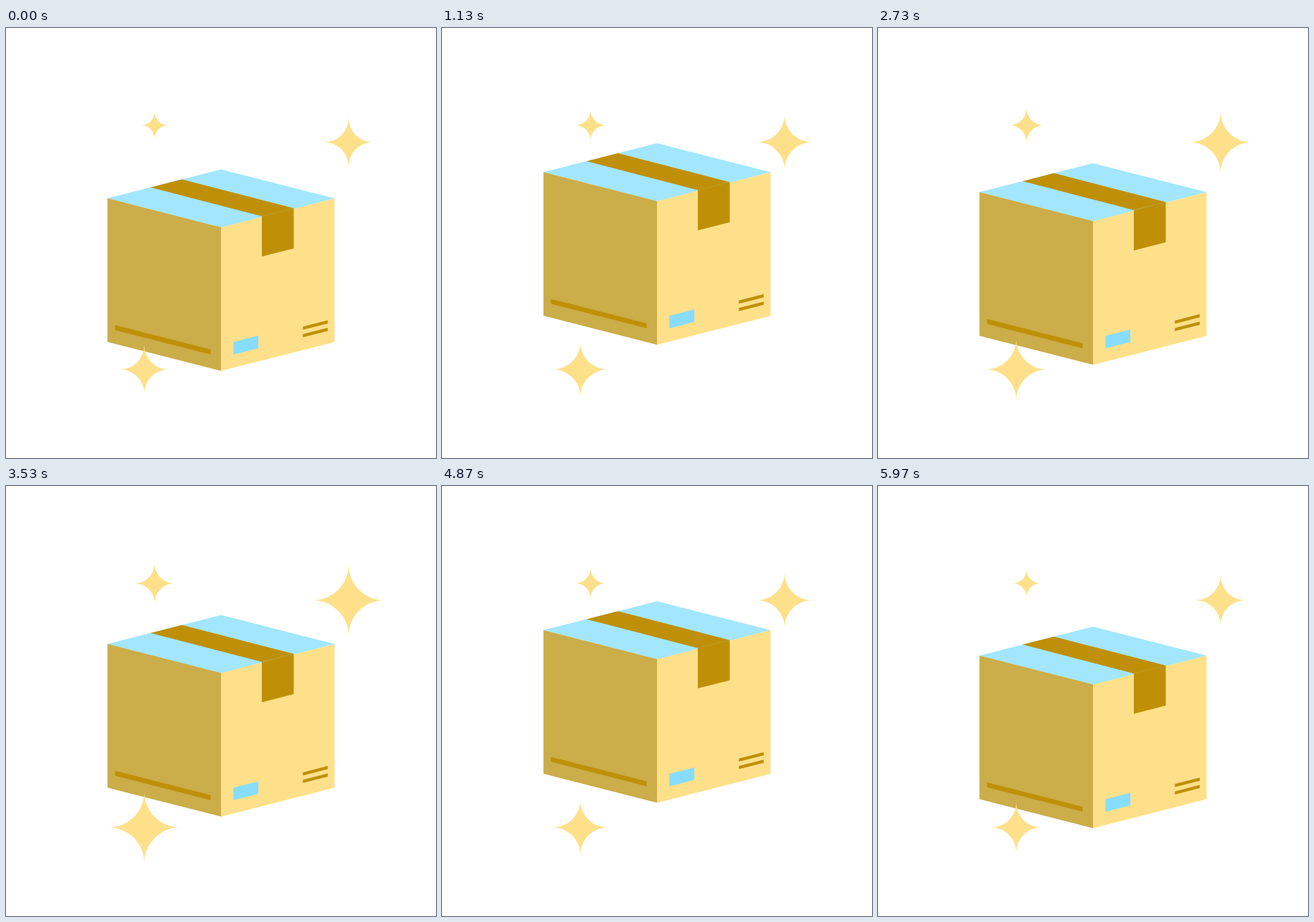
These frames come from a looping animation (748x748 px, 6 s). An HTML page with a canvas:

```html
<!DOCTYPE html>
<html lang="en">
<head>
<meta charset="utf-8">
<title>Parcel with sparkles</title>
<style>
  html, body { margin: 0; width: 100%; height: 100%; overflow: hidden; background: #fff; }
  canvas { display: block; width: 748px; height: 748px; }
</style>
</head>
<body>
<canvas id="stage" width="748" height="748"></canvas>
<script>
const ctx = document.getElementById('stage').getContext('2d');
const SIZE = 748;
const LOOP = 6000;
const SLOPE = 50.4 / 197.5;
const LIFT = 60.3;

const COLORS = {
  side: '#cbad49',
  front: '#ffe08a',
  lid: '#a3e6ff',
  tape: '#bf9007',
  label: '#87ddff'
};

// Triangle wave 0 -> 1 -> 0 over one period, in steps of 1/30 s
function swing(step, period) {
  const phase = (step % period) / period;
  return 1 - Math.abs(2 * phase - 1);
}

function poly(color, points) {
  ctx.fillStyle = color;
  ctx.beginPath();
  points.forEach(([x, y]) => ctx.lineTo(x, y));
  ctx.closePath();
  ctx.fill();
}

// Upright parallelogram: left edge at (x, y), top edge slanted by slope
function panel(color, x, y, w, h, slope) {
  const dy = w * slope;
  poly(color, [[x, y], [x + w, y + dy], [x + w, y + dy + h], [x, y + h]]);
}

function drawBox(lift) {
  ctx.save();
  ctx.translate(0, -lift);

  poly(COLORS.lid, [[374, 246], [571.5, 296.3], [374, 347], [176.5, 296.3]]);
  panel(COLORS.side, 176.5, 296.3, 197.5, 249.8, SLOPE);
  panel(COLORS.front, 374, 346.8, 197.5, 249.8, -SLOPE);

  poly(COLORS.tape, [[251.5, 277.2], [306, 263.3], [500.5, 313.5], [445, 327.5]]);
  panel(COLORS.tape, 445, 327.6, 55.5, 70, -SLOPE);

  panel(COLORS.tape, 189.5, 516.8, 166.5, 8.6, SLOPE);
  panel(COLORS.tape, 516.4, 519.6, 43.3, 5.5, -SLOPE);
  panel(COLORS.tape, 516.4, 532.5, 43.3, 5.5, -SLOPE);
  panel(COLORS.label, 395.5, 546.2, 43.4, 21.8, -SLOPE);

  ctx.restore();
}

// Four-pointed star whose sides are inward quarter arcs
function drawStar(x, y, radius, scale) {
  const r = radius * scale;
  ctx.fillStyle = COLORS.front;
  ctx.beginPath();
  ctx.moveTo(x, y - r);
  ctx.arc(x + r, y - r, r, Math.PI, Math.PI / 2, true);
  ctx.arc(x + r, y + r, r, Math.PI * 1.5, Math.PI, true);
  ctx.arc(x - r, y + r, r, 0, -Math.PI / 2, true);
  ctx.arc(x - r, y - r, r, Math.PI / 2, 0, true);
  ctx.closePath();
  ctx.fill();
}

function draw(ms) {
  const step = Math.floor(ms * 0.03 + 0.15);
  const scale = 1 + 0.5 * swing(step, 30);

  ctx.fillStyle = '#fff';
  ctx.fillRect(0, 0, SIZE, SIZE);
  drawBox(LIFT * swing(step, 90));
  drawStar(595.8, 198.7, 42.2, scale);
  drawStar(258.5, 169.3, 23.5, scale);
  drawStar(240.5, 594, 42.2, scale);
}

const start = performance.now();

function tick() {
  draw((performance.now() - start) % LOOP);
  requestAnimationFrame(tick);
}

tick();
</script>
</body>
</html>
```
